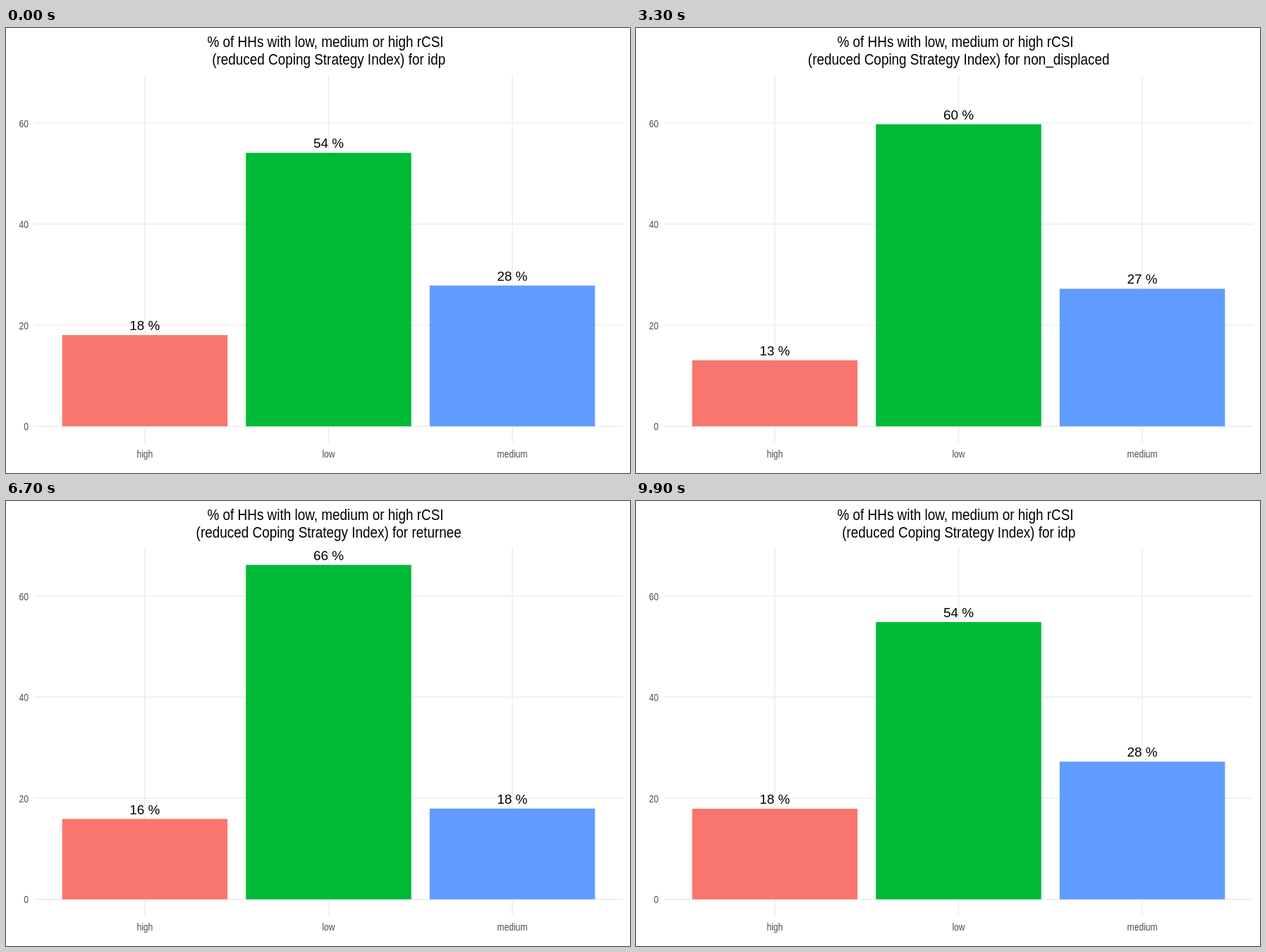
Write an HTML page that moves like this. It is 885 by 632 pixels and loops after 10000 ms.

```html
<!DOCTYPE html>
<html lang="en">
<head>
<meta charset="utf-8">
<title>rCSI by group</title>
<style>
  html, body { margin: 0; width: 100%; height: 100%; overflow: hidden; background: #fff; }
  svg { display: block; width: 100%; height: 100%; }
  text { font-family: "Liberation Sans", Arial, sans-serif; }
  .title { font-size: 22px; }
  .axis { font-size: 14.8px; fill: #4d4d4d; }
  .label { font-size: 18.9px; text-anchor: middle; }
  .grid { stroke: #ebebeb; stroke-width: 1.4; }
</style>
</head>
<body>
<svg viewBox="0 0 885 632"></svg>
<script>
const svg = document.querySelector('svg');
const STEP = 100, COUNT = 100;
const BASE = 565.7, UNIT = 7.18, BAR = 234.5;
const TITLE_X = 0.86, AXIS_X = 0.82;

const bars = [
  { name: 'high', x: 196.9, fill: '#f8766d' },
  { name: 'low', x: 457.5, fill: '#00ba38' },
  { name: 'medium', x: 718.1, fill: '#619cff' }
];
const states = [
  { name: 'idp', values: [18.05, 54.1, 27.85] },
  { name: 'non_displaced', values: [13.05, 59.75, 27.2] },
  { name: 'returnee', values: [15.9, 66.15, 17.95] }
];
// Step numbers where each move begins and ends, and where the title switches
const moves = [
  { start: 16, end: 33, title: 26 },
  { start: 50, end: 67, title: 60 },
  { start: 84, end: 100, title: 93 }
];

const yOf = v => BASE - v * UNIT;

function add(tag, attrs, text = '') {
  const el = document.createElementNS(svg.namespaceURI, tag);
  for (const key in attrs) el.setAttribute(key, attrs[key]);
  el.textContent = text;
  return svg.appendChild(el);
}

// Condensed type, anchored at (x, y)
function narrow(cls, x, y, scale, anchor, text) {
  return add('text', {
    class: cls, 'text-anchor': anchor,
    transform: `translate(${x} ${y}) scale(${scale} 1)`
  }, text);
}

for (const v of [0, 20, 40, 60]) {
  add('line', { class: 'grid', x1: 40, x2: 875, y1: yOf(v), y2: yOf(v) });
  narrow('axis', 32, yOf(v) + 5.6, AXIS_X, 'end', v);
}
for (const b of bars) {
  add('line', { class: 'grid', x1: b.x, x2: b.x, y1: 66.5, y2: 588.5 });
  narrow('axis', b.x, 609.5, AXIS_X, 'middle', b.name);
}
for (const b of bars) b.rect = add('rect', { x: b.x - BAR / 2, width: BAR, fill: b.fill });
for (const b of bars) b.label = add('text', { class: 'label', x: b.x });

narrow('title', 285.5, 27.3, TITLE_X, 'start', '% of HHs with low, medium or high rCSI');
const subtitle = narrow('title', 457.7, 52.3, TITLE_X, 'middle');

function draw(ms) {
  const n = Math.floor(ms / STEP) % COUNT;
  const i = moves.findIndex(m => n < m.end);
  const move = moves[i], from = states[i], to = states[(i + 1) % states.length];
  const k = Math.max(0, (n - move.start) / (move.end - move.start));
  const shown = k < 0.5 ? from : to;

  bars.forEach((b, j) => {
    const top = yOf(from.values[j] + (to.values[j] - from.values[j]) * k);
    b.rect.setAttribute('y', top);
    b.rect.setAttribute('height', BASE - top);
    b.label.setAttribute('y', top - 7);
    b.label.textContent = Math.round(shown.values[j]) + ' %';
  });
  const group = n < move.title ? from : to;
  subtitle.textContent = `(reduced Coping Strategy Index) for ${group.name}`;
}

const t0 = performance.now();
function tick() {
  draw(performance.now() - t0);
  requestAnimationFrame(tick);
}
tick();
</script>
</body>
</html>
```
